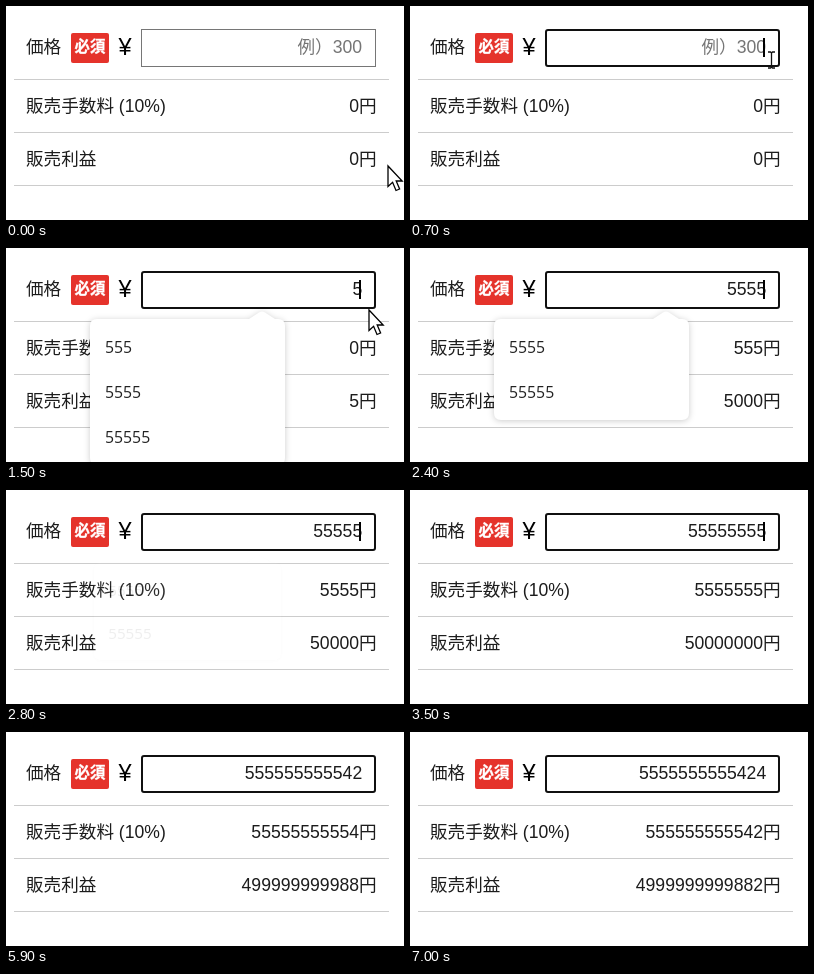
An HTML page for the animation above (7.2 s loop, 398x214 px).

```html
<!DOCTYPE html>
<html lang="ja">
<head>
<meta charset="utf-8">
<title>販売利益の計算</title>
<style>
html, body { margin: 0; width: 100%; height: 100%; overflow: hidden; background: #fff; }
svg { display: block; width: 398px; height: 214px; }
text { font: 17.6px "Liberation Sans", Arial, "Noto Sans CJK JP", "Noto Sans CJK", sans-serif; fill: #1c1c1c; }
.end { text-anchor: end; }
#hint { fill: #757575; }
#badge { font-size: 15.4px; font-weight: 900; fill: #fff; stroke: #fff; stroke-width: .3px; text-anchor: middle; }
#yen { font-size: 23.5px; fill: #000; }
#popup text { font: 15.8px "Open Sans", "Noto Sans", sans-serif; fill: #222; }
#popup .box { fill: #fff; filter: drop-shadow(0 1px 3px rgba(0, 0, 0, .2)); }
</style>
</head>
<body>
<svg viewBox="0 0 398 214">
  <path d="M8 73.5H383M8 126.5H383M8 179.5H383" stroke="#ccc"/>
  <text x="20" y="47">価格</text>
  <rect x="65" y="27" width="38" height="30" rx="2" fill="#e5332b"/>
  <text id="badge" x="84" y="46">必須</text>
  <text id="yen" x="112.5" y="49">¥</text>
  <rect id="field" fill="#fff"/>
  <text id="hint" class="end" x="356" y="47">例）300</text>
  <text id="price" class="end" x="356.2" y="47"></text>
  <rect id="caret" x="353" y="32" width="2" height="19"/>
  <text x="20" y="106">販売手数料 (10%)</text>
  <text id="fee" class="end" x="370.6" y="106"></text>
  <text x="20" y="159">販売利益</text>
  <text id="profit" class="end" x="370.6" y="159"></text>
  <g id="popup">
    <path class="box"/>
    <text x="99"></text><text x="99"></text><text x="99"></text>
  </g>
  <path id="arrow" d="M0 0V20.5L4.6 16.3L8 24.5L11.6 23L8.2 15H14.2Z" fill="#fff" stroke="#000" stroke-width="1.3"/>
  <path id="beam" d="M-3.5 -8H-1L0 -7L1 -8H3.5M0 -7V7M-3.5 8H-1L0 7L1 8H3.5" fill="none" stroke="#111" stroke-width="1.3"/>
</svg>
<script>
const LOOP = 7200, STEP = 100, FOCUS = 500;
const $ = id => document.getElementById(id);

// [time, typed value]
const typing = [
  [0, ""], [1200, "5"], [1700, "55"], [2200, "555"], [2400, "5555"], [2700, "55555"],
  ...[6, 7, 8, 9, 10].map((n, i) => [3300 + i * STEP, "5".repeat(n)]),
  [4400, "55555555554"], [5000, "555555555542"], [6300, "5555555555424"]
];
// [time, x, y]
const mouse = [
  [0, 382, 160], [200, 376, 122], [400, 362, 58], [500, 361.5, 54], [1200, 361.5, 54],
  [1400, 363, 62], [1600, 363, 62], [1800, 376, 168]
];
// [time, opacity, scale]
const fade = [
  [0, 0, 1], [1200, .3, .97], [1300, .8, .99], [1400, 1, 1],
  [2700, .6, .98], [2800, .07, .96], [2900, 0, .96]
];
const caretOff = [[0, 500], [1000, 1200], [4200, 4400], [4900, 5000], [5600, 6100], [6900, LOOP]];

const last = (rows, t) => rows.filter(r => r[0] <= t).pop();

function glide(rows, t) {
  const a = last(rows, t), b = rows[rows.indexOf(a) + 1] || a;
  const k = a === b ? 0 : (t - a[0]) / (b[0] - a[0]);
  return [a[1] + (b[1] - a[1]) * k, a[2] + (b[2] - a[2]) * k];
}

function show(el, on) {
  el.style.display = on ? "" : "none";
}

function setField(focused) {
  const inset = focused ? 24 : 23.5;
  const attrs = {
    x: 112 + inset, y: inset, width: focused ? 233 : 234, height: focused ? 36 : 37,
    rx: focused ? 2 : 0, stroke: focused ? "#101010" : "#767676", "stroke-width": focused ? 2 : 1
  };
  for (const k in attrs) $("field").setAttribute(k, attrs[k]);
}

function drawPopup(t) {
  const [, opacity, scale] = last(fade, t);
  const rows = t < 2200 ? ["555", "5555", "55555"] : ["5555", "55555"];
  const bottom = 82 + rows.length * 45, mid = (71 + bottom) / 2;
  const popup = $("popup");
  show(popup, opacity > 0);
  popup.setAttribute("opacity", opacity);
  popup.setAttribute("transform", `translate(181.5 ${mid}) scale(${scale}) translate(-181.5 ${-mid})`);
  popup.querySelector("path").setAttribute("d",
    `M91 71H243L253 64.5Q256 62.5 259 64.5L269 71H272Q279 71 279 78V${bottom - 7}` +
    `Q279 ${bottom} 272 ${bottom}H91Q84 ${bottom} 84 ${bottom - 7}V78Q84 71 91 71Z`);
  popup.querySelectorAll("text").forEach((el, i) => {
    el.textContent = rows[i] || "";
    el.setAttribute("y", 105 + i * 45);
  });
}

function drawMouse(t) {
  const [x, y] = glide(mouse, t), inField = y < 61;
  for (const id of ["arrow", "beam"]) {
    $(id).setAttribute("transform", `translate(${x} ${y})`);
    show($(id), t < 1900 && inField === (id === "beam"));
  }
}

function draw(t) {
  const value = last(typing, t)[1], fee = Math.floor(value / 10);
  setField(t >= FOCUS);
  show($("hint"), !value);
  $("price").textContent = value;
  $("fee").textContent = fee + "円";
  $("profit").textContent = value - fee + "円";
  show($("caret"), !caretOff.some(([a, b]) => t >= a && t < b));
  drawPopup(t);
  drawMouse(t);
}

const start = performance.now();
function tick() {
  const t = (performance.now() - start) % LOOP;
  draw(Math.floor(t / STEP) * STEP);
  requestAnimationFrame(tick);
}
tick();
</script>
</body>
</html>
```
